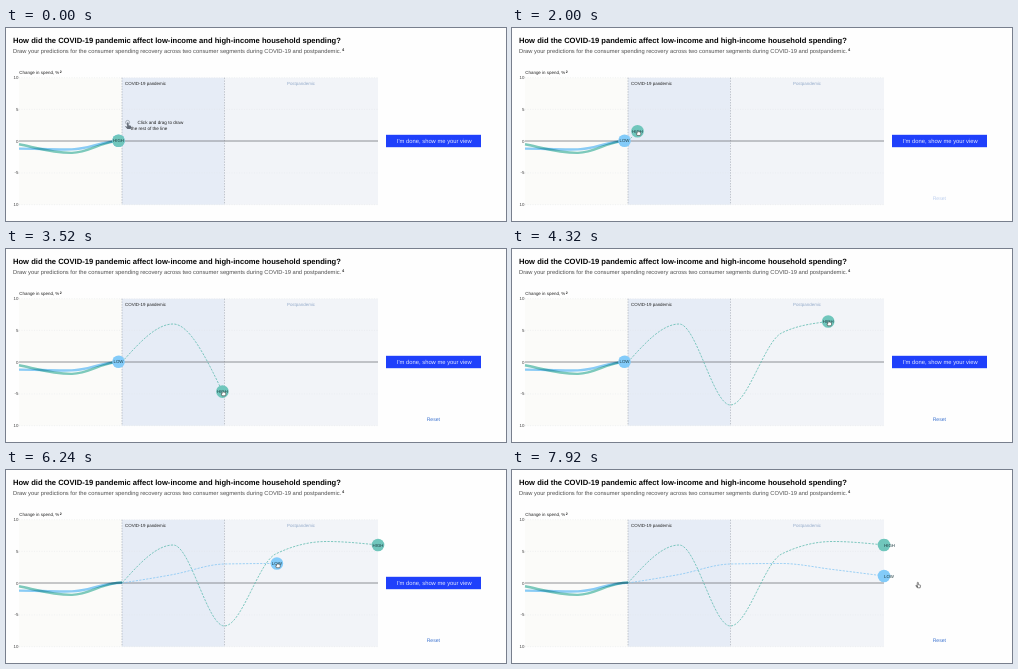
Write an HTML page that moves like this. It is 500x193 px and loops after 8 s.

```html
<!DOCTYPE html>
<html lang="en">
<head>
<meta charset="utf-8">
<title>Household spending</title>
<style>
  html, body { margin: 0; width: 100%; height: 100%; overflow: hidden; background: #fefefe; }
  svg { display: block; width: 100vw; height: 100vh; }
  text { font: 4.45px "Liberation Sans", Arial, sans-serif; fill: #222; text-rendering: geometricPrecision; }
  .title { font-size: 7.6px; font-weight: 700; fill: #050505; }
  .sub { font-size: 5.78px; fill: #505050; }
  .sup { font-size: 3.9px; font-weight: 700; }
  .tick { font-size: 4.4px; text-anchor: end; fill: #444; }
  .post { text-anchor: middle; fill: #94abca; }
  .hint text { font-size: 4.6px; }
  .button text { font-size: 5.83px; text-anchor: middle; fill: #dfe5ff; }
  .reset { font-size: 5.1px; fill: #3b72cf; }
  .grid { stroke: #dfe1e5; stroke-width: .4; stroke-dasharray: 1 1.5; }
  .edge { stroke: #979eaa; stroke-width: .55; stroke-dasharray: 1.5 1.2; }
  .line { fill: none; stroke-width: .75; stroke-dasharray: 2.2 1.3; }
  .past { fill: none; stroke-width: 2.4; mix-blend-mode: multiply; }
  .teal { stroke: #58b9ac; }
  .blue { stroke: #80c5f3; }
  .past.teal { stroke: #7fcdc0; }
  .past.blue { stroke: #8bcffb; }
  .knob text { font-size: 4.4px; fill: #1d3c42; }
  .hand { fill: #fff; stroke: #333; stroke-width: .7; stroke-linejoin: round; }
</style>
</head>
<body>
<svg viewBox="0 0 500 193" preserveAspectRatio="none">
  <defs>
    <path id="open" d="M-.9 3V-2.6Q-.9 -3.4 -.2 -3.4T.5 -2.6V-.3L2.8 .1Q3.3 .3 3.2 1L2.7 3.5H-.6L-2.8 1Q-2.7 0 -1.8 .6L-.9 1.4Z"/>
    <path id="fist" d="M-1.8 2.8L-2.7 .6Q-2.5 -.4 -1.7 .1V-1.5Q-.9 -2.4 -.3 -1.7Q.4 -2.4 1 -1.6Q1.8 -2 2.2 -1.2Q3 -1.1 2.9 -.3V1.2L2.2 2.8Z"/>
  </defs>

  <text class="title" x="7" y="14.8">How did the COVID-19 pandemic affect low-income and high-income household spending?</text>
  <text class="sub" x="7" y="25.4">Draw your predictions for the consumer spending recovery across two consumer segments during COVID-19 and postpandemic.</text>
  <text class="sup" x="336" y="23.4">4</text>
  <text x="13.3" y="46">Change in spend, %</text>
  <text class="sup" x="53.8" y="44.6" style="font-size: 3.5px">2</text>

  <rect x="13" y="49.7" width="103" height="127" fill="#fbfbf9"/>
  <rect x="116" y="49.7" width="102.5" height="127" fill="#e6ecf6"/>
  <rect x="218.5" y="49.7" width="153.5" height="127" fill="#f2f4f8"/>
  <path class="grid" d="M13 49.7H372M13 81.4H372M13 144.9H372M13 176.7H372"/>
  <path class="edge" d="M116 49.7V176.7M218.5 49.7V176.7"/>
  <g id="ticks"></g>
  <text x="119" y="56.7">COVID-19 pandemic</text>
  <text class="post" x="295" y="57.2">Postpandemic</text>
  <path d="M13 113H372" stroke="#6b6f75" stroke-width=".75"/>

  <path class="past blue" d="M13 120.6C31 120.6 48 121.9 66 121.4S94 113.2 116 112.8"/>
  <path class="past teal" d="M13 116.3C31 120 48 125.2 66 124.9S94 113.6 116 112.4"/>
  <path class="line blue" id="lowLine"/>
  <path class="line teal" id="highLine"/>

  <g class="knob" id="low"><circle r="6.3" fill="#83cbf9"/><text y="1.5">LOW</text></g>
  <g class="knob" id="high"><circle r="6.3" fill="#70c6bc"/><text y="1.5">HIGH</text></g>

  <g class="hint" id="hint">
    <circle cx="121.6" cy="94.4" r="2" fill="none" stroke="#7f8793" stroke-width=".6"/>
    <use href="#open" x="122" y="97.6" fill="#646c78"/>
    <text x="131.5" y="95.8">Click and drag to draw</text>
    <text x="124.8" y="101.6">the rest of the line</text>
  </g>

  <g class="button" id="button">
    <rect x="380" y="106.8" width="95" height="12.4" fill="#1f40fb"/>
    <text x="428.3" y="115.1">I'm done, show me your view</text>
  </g>
  <text class="reset" id="reset" x="420.7" y="172">Reset</text>
  <use class="hand" id="cursor"/>
</svg>
<script>
const LOOP = 8000, START_X = 116, STEP = 51.2, CLICK = 7900;
const $ = id => document.getElementById(id);
const clamp = v => Math.max(0, Math.min(1, v));
const toPoints = ys => ys.map((y, i) => [START_X + i * STEP, y]);

// Each series passes its evenly spaced nodes at the given times
const high = {
  id: "high",
  nodes: toPoints([113, 75, 156, 84, 71.5, 75]),
  times: [1850, 2720, 3800, 4080, 4420, 4640]
};
const low = {
  id: "low",
  nodes: toPoints([113, 104.5, 94, 93.5, 99.5, 106]),
  times: [0, 1, 2, 3, 4, 5].map(i => 5500 + 245 * i)
};

// Tangents of a monotone cubic through points with rising x
function slopes(p) {
  const n = p.length - 1, m = [];
  const h = i => p[i + 1][0] - p[i][0];
  const s = i => (p[i + 1][1] - p[i][1]) / h(i);
  for (let i = 1; i < n; i++) {
    const a = s(i - 1), b = s(i);
    const mean = (a * h(i) + b * h(i - 1)) / (h(i - 1) + h(i));
    m[i] = (Math.sign(a) + Math.sign(b)) * Math.min(Math.abs(a), Math.abs(b), Math.abs(mean) / 2);
  }
  m[0] = n > 1 ? (3 * s(0) - m[1]) / 2 : s(0);
  m[n] = n > 1 ? (3 * s(n - 1) - m[n - 1]) / 2 : s(0);
  return m;
}

function curve(p) {
  if (p.length < 2) return "";
  const m = slopes(p);
  return `M${p[0]}` + p.slice(1).map(([X, Y], i) => {
    const [x, y] = p[i], k = (X - x) / 3;
    return `C${x + k},${y + k * m[i]} ${X - k},${Y - k * m[i + 1]} ${X},${Y}`;
  }).join("");
}

// The knob rises and falls along the curve while x runs slightly ahead
function knobAt({ nodes, times }, t) {
  if (t < times[0]) return [START_X - 3.5, 112.8];
  const last = times.length - 1;
  if (t >= times[last]) return nodes[last];
  const i = times.findIndex(v => v > t) - 1;
  const u = (t - times[i]) / (times[i + 1] - times[i]), v = 1 - u;
  const m = slopes(nodes), [x, y] = nodes[i], Y = nodes[i + 1][1];
  return [
    x + STEP * Math.min(1, u * (1 + .4 * u)),
    v * v * (1 + 2 * u) * y + u * u * (3 - 2 * u) * Y + u * v * STEP * (v * m[i] - u * m[i + 1])
  ];
}

function glide(from, to, start, end, t) {
  const u = clamp((t - start) / (end - start)), e = u * u * (3 - 2 * u);
  return from.map((v, i) => v + (to[i] - v) * e);
}

function cursorAt(t) {
  const held = (series, time) => {
    const [x, y] = knobAt(series, time);
    return [x + 1, y + 2];
  };
  if (t < high.times[0]) return glide([456, 134], held(high, t), 80, 1040, t);
  if (t < 4760) return held(high, t);
  if (t < low.times[0]) return glide(held(high, t), [113.5, 116.2], 4760, 5150, t);
  return glide(held(low, t), [406, 115], 6850, 7280, t);
}

const place = (id, [x, y], scale = 1) =>
  $(id).setAttribute("transform", `translate(${x} ${y}) scale(${scale})`);

function drawSeries(series, t) {
  const { id, nodes } = series;
  const knob = knobAt(series, t);
  const points = nodes.filter(p => p[0] < knob[0] - .8);
  if (points.length) points.push(knob);
  $(id + "Line").setAttribute("d", curve(points));
  place(id, knob);
  $(id).lastChild.setAttribute("text-anchor", t < CLICK ? "middle" : "start");
}

function draw(t) {
  drawSeries(low, t);
  drawSeries(high, t);
  const dragging = [high, low].some(({ times }) => t > times[0] && t < times[5]);
  $("cursor").setAttribute("href", dragging ? "#fist" : "#open");
  place("cursor", cursorAt(t), .8);
  $("cursor").style.opacity = t < 80 ? 0 : 1;
  $("hint").style.opacity = 1 - clamp((t - 1750) / 200);
  $("reset").style.opacity = clamp((t - 1900) / 300);
  $("button").style.opacity = t < CLICK ? 1 : 0;
}

$("ticks").innerHTML = ["10", "5", "0", "-5", "10"]
  .map((label, i) => `<text class="tick" x="12.4" y="${51 + i * 31.75}">${label}</text>`).join("");

function tick() {
  draw(performance.now() % LOOP);
  requestAnimationFrame(tick);
}
tick();
</script>
</body>
</html>
```
